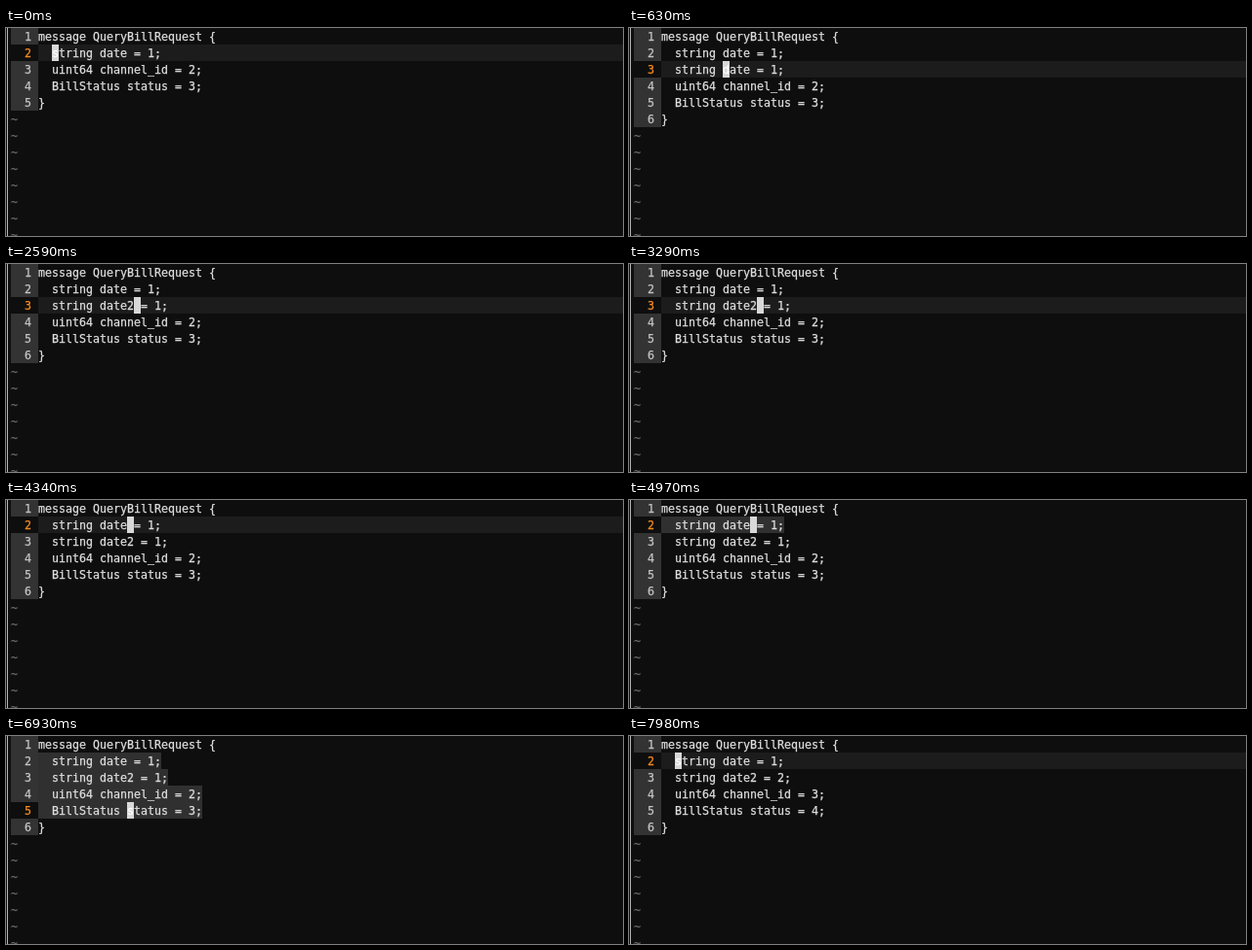
An HTML page with a canvas for the animation above (8 s loop, 632x214 px).

```html
<!DOCTYPE html>
<html>
<head>
<meta charset="utf-8">
<style>
  html, body { margin: 0; width: 100%; height: 100%; overflow: hidden; background: #0e0e0e; }
  canvas { display: block; }
</style>
</head>
<body>
<canvas id="screen" width="632" height="214"></canvas>
<script>
const ctx = document.getElementById('screen').getContext('2d');
const LOOP = 8000, CELL = 7, ROW = 17, TEXT_X = 33, GUTTER_X = 5;
const BG = '#0e0e0e', FG = '#dedede';

const before = [
  'message QueryBillRequest {',
  '  string date = 1;',
  '  uint64 channel_id = 2;',
  '  BillStatus status = 3;',
  '}'
];
const withLine = (line) => [...before.slice(0, 2), line, ...before.slice(2)];
const copied = withLine('  string date = 1;');
const renamed = withLine('  string date2 = 1;');
const numbered = renamed.map((s, i) => s.replace(/\d;$/, i + ';'));

// Editor states: start time, text, cursor row and column, first selected row
const states = [
  [0, before, 1, 2],
  [70, copied, 2, 2],
  [560, copied, 2, 9],
  [1050, copied, 2, 12],
  [1400, copied, 2, 13],
  [2590, renamed, 2, 14],
  [3640, renamed, 2, 13],
  [4200, renamed, 1, 13],
  [4970, renamed, 1, 13, 1],
  [5180, renamed, 2, 13, 1],
  [5390, renamed, 3, 13, 1],
  [5530, renamed, 4, 13, 1],
  [7140, numbered, 1, 2]
];

function box(x, y, w, h, color) {
  ctx.fillStyle = color;
  ctx.fillRect(x, y, w, h);
}

function print(text, x, row, color) {
  ctx.fillStyle = ctx.strokeStyle = color;
  [...text].forEach((ch, i) => {
    ctx.fillText(ch, x + i * CELL, row * ROW + 13);
    ctx.strokeText(ch, x + i * CELL, row * ROW + 13);
  });
}

function draw(t) {
  const [, lines, row, col, from] = states.filter(s => s[0] <= t).pop();
  const visual = from !== undefined;
  ctx.font = '11.63px "DejaVu Sans Mono", monospace';
  ctx.lineWidth = 0.25;
  box(0, 0, 632, 214, BG);
  box(1, 0, 1, 214, '#b4b4b4');

  lines.forEach((line, i) => {
    const y = i * ROW, current = i === row;
    if (current && !visual) box(TEXT_X, y, 632 - TEXT_X, ROW, '#1c1c1c');
    if (visual && i >= from && i <= row) box(TEXT_X, y, line.length * CELL, ROW, '#303030');
    if (!current) box(GUTTER_X, y, TEXT_X - GUTTER_X, ROW, '#333');
    print(String(i + 1), GUTTER_X + 2 * CELL, i, current ? '#f58a1f' : '#c4c4c4');
    print(line, TEXT_X, i, FG);
  });

  const x = TEXT_X + col * CELL;
  box(x, row * ROW, CELL, ROW, '#d8d8d8');
  print(lines[row][col], x, row, '#fff');

  for (let i = lines.length; i < 13; i++) print('~', GUTTER_X, i, '#6c6c6c');
}

function frame() {
  draw(performance.now() % LOOP);
  requestAnimationFrame(frame);
}
frame();
</script>
</body>
</html>
```
